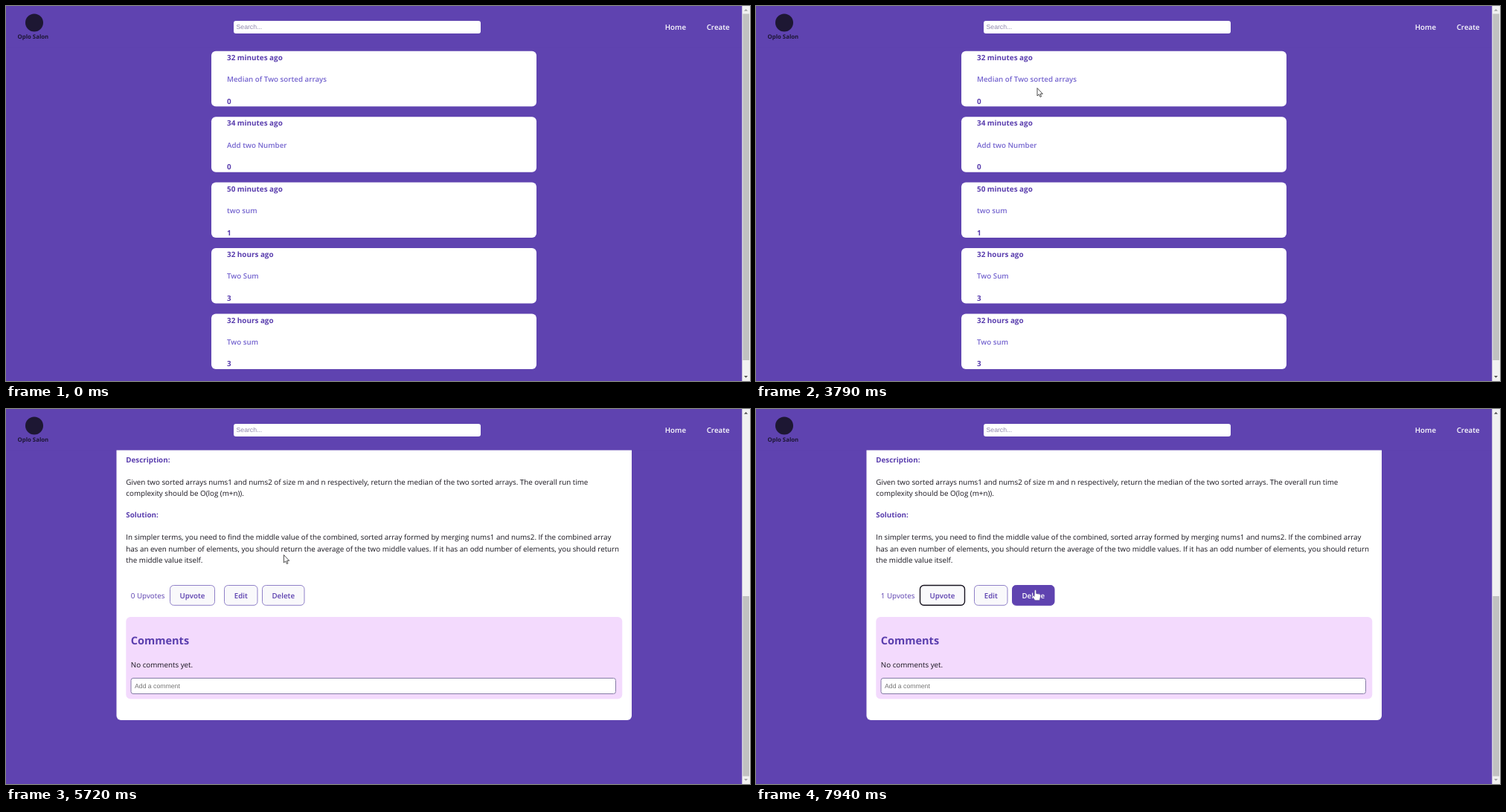
An HTML page for the animation above (8 s loop, 1000 px wide and 505 px high).

```html
<!DOCTYPE html>
<html lang="en">
<head>
<meta charset="utf-8">
<title>Forum walkthrough</title>
<style>
  html, body { margin: 0; width: 100%; height: 100%; overflow: hidden; background: #5f43b0; }
  svg { display: block; width: 100%; height: 100%; }
  text { font-family: "Open Sans", "Noto Sans", sans-serif; text-rendering: geometricPrecision; white-space: pre; }
  .mono { font-family: "Noto Sans Mono", "DejaVu Sans Mono", monospace; }
  .arial { font-family: "Liberation Sans", Arial, sans-serif; }
</style>
</head>
<body>
<svg id="stage" viewBox="0 0 1000 505"></svg>
<script>
const PURPLE = '#5f43b0', INK = '#5a3eae', GREY = '#757575', DARK = '#262626';
const LOOP = 8000, MAX_SCROLL = 501;

const text = (x, y, str, size = 9.8, weight = 400, fill = DARK, cls = '') =>
  `<text x="${x}" y="${y}" font-size="${size}" font-weight="${weight}" fill="${fill}" class="${cls}">${str}</text>`;
const rect = (x, y, w, h, r, fill, extra = '') =>
  `<rect x="${x}" y="${y}" width="${w}" height="${h}" rx="${r}" fill="${fill}" ${extra}/>`;
const group = (id, ...parts) => `<g id="${id}">${parts.join('')}</g>`;

// List of posts
const posts = [
  ['32 minutes ago', 'Median of Two sorted arrays', 0],
  ['34 minutes ago', 'Add two Number', 0],
  ['50 minutes ago', 'two sum', 1],
  ['32 hours ago', 'Two Sum', 3],
  ['32 hours ago', 'Two sum', 3],
];
const list = posts.map(([age, title, votes], i) => {
  const y = 60.8 + i * 88.4;
  return rect(276, y, 437, 74.5, 6, '#fff') +
    text(297, y + 12.2, age, 9.9, 700, INK) +
    text(297, y + 41.4, title, 9.75, 600, '#7565cf') +
    text(297, y + 71, votes, 9.9, 700, INK);
}).join('');

// Problem statement
const stmt = (x, y, str, weight) => text(x, y, str, 11.6, weight, '#37424a');
const mono = (x, y, str) => text(x, y, str, 10.5, 400, '#3c474f', 'mono');
const chip = (x, y, str) =>
  rect(x - 4, y - 10.5, str.length * 6.3 + 8, 14.5, 2, '#f6f8f9') + mono(x, y, str);
const example = (n, y, rows) =>
  stmt(174.5, y, `Example ${n}:`, 700) + rect(174, y + 15.5, 504, 74, 3, '#f7f9fa') +
  rows.map(([label, value], i) =>
    mono(187.5, y + 38.7 + i * 18.2, `<tspan font-weight="700">${label}:</tspan> ${value}`)).join('');
const meta = (x, str) => text(x, 151, str, 10.3, 400, GREY);
const thumb = 'M0 4.5h2.6v7H0zM3.6 4.5L7 0Q8.5.4 8 2L7.5 4.5h3.8q1 .3.8 1.4l-1.4 4.8q-.3.8-1.2.8H3.6z';

const statement = [
  text(174.5, 124, '4. Median of Two Sorted Arrays', 13.3, 600, '#212121'),
  text(174.5, 151, 'Hard', 10.8, 600, '#6a2c91'),
  `<path d="${thumb}" transform="translate(219 141.3)" fill="#616161"/>`,
  meta(235.5, '8409'),
  `<g fill="none" stroke="#6b6b6b" stroke-width="1.1">
    <path d="${thumb}" transform="translate(290 153) scale(-.92)"/>
    <path d="M343.5 152.3L339 148q-2-4.500 1.500-5.300 2-.2 3 1.500 1-1.700 3-1.500 3.500.8 1.500 5.300z"/>
    <path d="M429 143h-3v9h9v-3.500M429.500 149q0-5 6-5M433 141.500l3 2.500-3 2.500"/>
  </g>`,
  meta(296, '1299'), meta(355, 'Add to List'), meta(442, 'Share'),
  rect(176, 167.8, 501, 1, 0, '#e9e9e9'),
  rect(696.3, 98.500, 4.4, 160, 1, '#dadada'),
  stmt(174.5, 195, 'Given two sorted arrays'), chip(309, 195, 'nums1'),
  stmt(347.5, 195, 'and'), chip(375, 195, 'nums2'),
  stmt(413, 195, 'of size'), chip(455, 195, 'm'),
  stmt(467, 195, 'and'), chip(495, 195, 'n'),
  stmt(508, 195, 'respectively, return'), stmt(614.5, 195, 'the', 700),
  stmt(174.5, 214, 'median', 700), stmt(221, 214, 'of the two sorted arrays.'),
  stmt(174.5, 244.5, 'Follow up:', 700),
  stmt(238, 244.5, 'The overall run time complexity should be'),
  chip(472, 244.5, 'O(log (m+n))'), stmt(550.5, 244.5, '.'),
  example(1, 306, [
    ['Input', 'nums1 = [1,3], nums2 = [2]'],
    ['Output', '2.00000'],
    ['Explanation', 'merged array = [1,2,3] and median is 2.'],
  ]),
  example(2, 419.5, [
    ['Input', 'nums1 = [1,2], nums2 = [3,4]'],
    ['Output', '2.50000'],
    ['Explanation', 'merged array = [1,2,3,4] and median is (2 + 3) / 2 = 2.5.'],
  ]),
].join('');

// Lower half of the post, laid out as seen when scrolled to the end
const buttons = [
  { name: 'Upvote', x: 220.5, w: 60 },
  { name: 'Edit', x: 293.5, w: 44.5 },
  { name: 'Delete', x: 344.5, w: 56.5 },
];
const para = (y, lines) => lines.map((s, i) => text(161.3, y + i * 15.6, s, 9.8, 400, '#16131c')).join('');
const answer = [
  text(161.3, 72, 'Description:', 9.8, 700, INK),
  para(101.5, [
    'Given two sorted arrays nums1 and nums2 of size m and n respectively, return the median of the two sorted arrays. The overall run time',
    'complexity should be O(log (m+n)).',
  ]),
  text(161.3, 146, 'Solution:', 9.8, 700, INK),
  para(176, [
    'In simpler terms, you need to find the middle value of the combined, sorted array formed by merging nums1 and nums2. If the combined array',
    'has an even number of elements, you should return the average of the two middle values. If it has an odd number of elements, you should return',
    'the middle value itself.',
  ]),
  `<text id="votes" x="167.8" y="255" font-size="9.8" fill="${INK}"></text>`,
  ...buttons.map(b => group(b.name,
    rect(b.x, 237.5, b.w, 26.8, 5, '#f9f9fb', 'stroke="#8f80c8"'),
    `<text x="${b.x + b.w / 2}" y="255" font-size="9.8" font-weight="600" text-anchor="middle">${b.name}</text>`)),
  rect(161.3, 280, 667, 110.5, 6, '#f3dafd'),
  text(167.8, 317, 'Comments', 14.5, 700, INK),
  text(167.8, 348, 'No comments yet.', 9.8, 400, '#16131c'),
  rect(168, 362.5, 651.5, 21, 3, '#fff', 'stroke="#857ba6"'),
  text(173, 375.7, 'Add a comment', 8.7, 400, GREY, 'arial'),
].join('');

document.getElementById('stage').innerHTML = [
  rect(0, 0, 1000, 505, 0, PURPLE),
  group('list', list),
  group('loading', text(478.5, 257, 'Loading..', 9.8, 600, '#483290')),
  group('post', rect(148.5, 86, 692.5, 834, 6, '#fff'), statement,
    `<g transform="translate(0 ${MAX_SCROLL})">${answer}</g>`),
  rect(0, 0, 1000, 55.5, 0, PURPLE),
  '<circle cx="38" cy="22.500" r="12" fill="#1d1733"/>',
  text(15.5, 44, 'Oplo Salon', 7.8, 700, '#1d1733'),
  group('search', rect(306, 20, 332, 17, 3, '#fff'),
    text(309.5, 31, 'Search...', 8.7, 400, '#8f88ad', 'arial')),
  group('nav', text(885.8, 32, 'Home', 9.75, 600, '#fff'), text(941.7, 32, 'Create', 9.75, 600, '#fff')),
  group('bar', rect(989.3, 0, 10.7, 505, 0, '#f1f1f1'),
    '<rect id="knob" x="990.3" width="8.700" fill="#c1c1c1"/>',
    '<path id="up" d="M992 6.800h5l-2.500-2.800z"/><path id="down" d="M992 498h5l-2.500 2.800z"/>'),
  group('cursor',
    '<path id="arrow" d="M0 0V10.500L2.400 8.400 4 12 5.600 11.300 4.100 7.800H7.300Z" fill="#fff" stroke="#222" stroke-width=".8"/>',
    '<path id="hand" d="M-1.200 1.200Q0-1 1.200 1.200V5L5.500 5.800Q7.300 6.300 6.900 8.800L5.700 14.200H-.5L-4 9.400Q-4.200 7.200-2.400 8L-1.200 9Z" fill="#fff" stroke="#3a2a78" stroke-width=".5"/>'),
].join('');

const el = id => document.getElementById(id);
const show = (id, on) => { el(id).style.display = on ? '' : 'none'; };

// Pointer path: time, x, y
const path = [
  [2420, 985, 50], [2570, 774, 114], [2800, 600, 127], [3200, 392, 122], [3790, 378, 110.5],
  [4120, 378, 110.5], [4200, 377, 97], [5000, 377, 97], [5130, 367, 99], [5230, 367, 99],
  [5920, 376, 236], [6360, 376, 236], [6620, 264, 246], [6970, 258, 247], [7410, 258, 247],
  [7700, 350, 247], [7940, 375.5, 243.5], [LOOP, 375.5, 243.5],
];
function pointer(t) {
  const i = Math.max(1, path.findIndex(p => p[0] >= t));
  const [t0, x0, y0] = path[i - 1], [t1, x1, y1] = path[i];
  const k = Math.max(0, (t - t0) / (t1 - t0));
  return [x0 + (x1 - x0) * k, y0 + (y1 - y0) * k];
}
function smooth(t, from, to) {
  const k = Math.min(1, Math.max(0, (t - from) / (to - from)));
  return k * k * (3 - 2 * k);
}

function draw(t) {
  const onList = t < 4500, onPost = t >= 4760, loading = !onList && !onPost;
  show('list', onList);
  show('loading', loading);
  show('post', onPost);
  show('bar', !loading);
  el('search').setAttribute('transform', `translate(${loading ? 5.5 : 0} 0)`);
  el('nav').setAttribute('transform', `translate(${loading ? 11 : 0} 0)`);

  const scrolled = smooth(t, 5230, 5720);
  el('post').setAttribute('transform', `translate(0 ${-MAX_SCROLL * scrolled})`);
  el('knob').setAttribute('y', 10.5 + 241.5 * scrolled);
  el('knob').setAttribute('height', onList ? 466.5 : 242.5);
  el('up').setAttribute('fill', scrolled > 0 ? '#505050' : '#a3a3a3');
  el('down').setAttribute('fill', scrolled < 1 ? '#505050' : '#a3a3a3');

  const [x, y] = pointer(t);
  let overButton = false;
  for (const b of buttons) {
    const hover = scrolled === 1 && y > 237.5 && y < 264 && x > b.x && x < b.x + b.w;
    const focus = b.name === 'Upvote' && t >= 6850;
    const [box, label] = el(b.name).children;
    overButton ||= hover;
    box.setAttribute('fill', hover ? PURPLE : '#f9f9fb');
    box.setAttribute('stroke', focus ? '#17131f' : hover ? PURPLE : '#8f80c8');
    box.setAttribute('stroke-width', focus ? 1.4 : 1);
    label.setAttribute('fill', hover ? '#fff' : INK);
  }
  el('votes').textContent = `${t >= 6940 ? 1 : 0} Upvotes`;

  const hand = overButton || (t >= 4160 && t < 5000);
  show('cursor', t >= 2420);
  show('hand', hand);
  show('arrow', !hand);
  el('cursor').setAttribute('transform', `translate(${x} ${y})`);
}

const start = performance.now();
function frame() {
  draw((performance.now() - start) % LOOP);
  requestAnimationFrame(frame);
}
frame();
</script>
</body>
</html>
```
